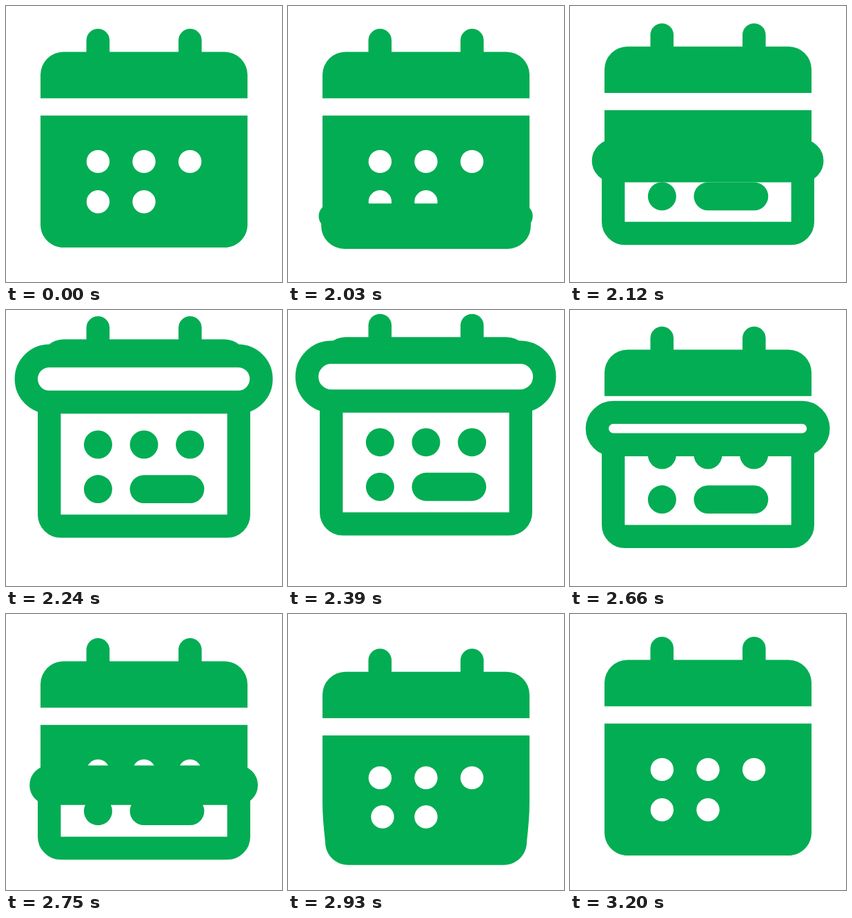
Recreate the animation shown at these times as an HTML page with a canvas. Size 400 by 400 pixels, loop 3.26 s.

```html
<!DOCTYPE html>
<html lang="en">
<head>
<meta charset="utf-8">
<title>Calendar</title>
<style>
  html, body { margin: 0; width: 100%; height: 100%; overflow: hidden; background: #fff; }
  canvas { display: block; width: 100vmin; height: 100vmin; }
</style>
</head>
<body>
<canvas id="stage" width="400" height="400"></canvas>
<script>
const ctx = document.getElementById('stage').getContext('2d');
const GREEN = '#03ad53', WHITE = '#fff';
const LOOP = 3260, START = 2000, STEP = 30, END = 1200;
const STROKE = 33.4, TAU = Math.PI * 2;

// Smooth curve through [time, value] keys that never overshoots between them.
function track(...keys) {
  const rise = i => (keys[i + 1][1] - keys[i][1]) / (keys[i + 1][0] - keys[i][0]);
  const slopes = keys.map((_, i) => {
    if (i === 0 || i === keys.length - 1) return 0;
    const a = rise(i - 1), b = rise(i);
    return a * b > 0 ? 2 * a * b / (a + b) : 0;
  });
  return t => {
    if (t <= keys[0][0]) return keys[0][1];
    const i = keys.findIndex(k => k[0] >= t) - 1;
    if (i < 0) return keys[keys.length - 1][1];
    const [t0, v0] = keys[i], [t1, v1] = keys[i + 1];
    const d = t1 - t0, u = (t - t0) / d, w = 1 - u;
    return v0 * (1 + 2 * u) * w * w + v1 * u * u * (3 - 2 * u)
      + d * u * w * (slopes[i] * w - slopes[i + 1] * u);
  };
}

const lift = track([0, 0], [30, 0], [240, -24], [330, -29], [480, -23.8], [540, -23.4],
  [660, -9], [820, 9.5], [930, 17.3], [1080, 1.5], [1200, 0]);
const open = track([0, 0], [30, .047], [135, .5], [240, 1], [330, 1.08], [480, 1.005], [540, 1],
  [660, .7], [760, .32], [860, 0]);
const squeeze = track([850, 0], [930, 4], [1080, -5.5], [1200, 0]);
const lag = track([780, 0], [930, 1], [1080, 0]);

function fillPath(color, build) {
  ctx.fillStyle = color;
  ctx.beginPath();
  build();
  ctx.fill();
}

const dot = (color, x, y, r) => fillPath(color, () => ctx.arc(x, y, r, 0, TAU));
const box = (x, y, w, h, r) => fillPath(GREEN, () => ctx.roundRect(x, y, w, h, r));

function clipped(y, h, draw) {
  ctx.save();
  ctx.beginPath();
  ctx.rect(0, y, 400, h);
  ctx.clip();
  draw();
  ctx.restore();
}

function solidIcon(dy, s, l) {
  for (const x of [116.5, 250]) box(x, 33 + dy, 33.6, 40, [16.8, 16.8, 0, 0]);
  box(50, 66.5 + dy, 300, 67.2, [33.3, 33.3, 0, 0]);

  const top = 158.7 + dy, bottom = 350 + dy - 3.5 * l;
  const left = 50 + s, right = 350 - s;
  const bend = bottom - 90, foot = bottom - 33.3;
  fillPath(GREEN, () => {
    ctx.moveTo(50, top);
    ctx.lineTo(350, top);
    ctx.lineTo(350, bend);
    ctx.quadraticCurveTo(350, bend + 22, right, foot);
    ctx.bezierCurveTo(right, foot + 18.4, right - 14.9, bottom, right - 33.3, bottom);
    ctx.lineTo(left + 33.3, bottom);
    ctx.bezierCurveTo(left + 14.9, bottom, left, foot + 18.4, left, foot);
    ctx.quadraticCurveTo(50, bend + 22, 50, bend);
  });

  const row1 = 225.4 + dy - 5.3 * l, row2 = 283.7 + dy - 7 * l;
  for (const x of [133.4, 200, 266.6]) dot(WHITE, x, row1, 16.7);
  dot(WHITE, 133.4 + s * .9, row2, 16.7);
  dot(WHITE, 200, row2, 16.7);
}

function outlineIcon(dy, ringY, grow, l) {
  const x = 66.7 - grow, right = 400 - x, r = STROKE / 2;
  const y = 333.3 + grow + dy - 3.5 * l;
  ctx.beginPath();
  ctx.moveTo(x, ringY);
  ctx.arcTo(x, y, 200, y, r);
  ctx.arcTo(right, y, right, ringY, r);
  ctx.lineTo(right, ringY);
  ctx.stroke();

  const row1 = 219 + dy, row2 = 283.6 + dy;
  for (const cx of [133.4, 200, 266.6]) dot(GREEN, cx, row1, 20.5);
  dot(GREEN, 133.4, row2, 20.5);
  box(179.5, row2 - 20.4, 107.8, 40.8, 20.4);
}

function draw(t) {
  const dy = lift(t), p = open(t), s = squeeze(t), l = lag(t);
  ctx.fillStyle = WHITE;
  ctx.fillRect(0, 0, 400, 400);
  ctx.strokeStyle = GREEN;
  ctx.lineWidth = STROKE;

  if (p < .001) {
    solidIcon(dy, s, l);
    return;
  }
  const ringY = 313.5 - 189.5 * Math.min(p, 1) + dy, r = 33.5 * p;
  clipped(0, ringY, () => solidIcon(dy, s, l));
  clipped(ringY, 400 - ringY, () => outlineIcon(dy, ringY, 4 * Math.min(1, p * 10), l));
  ctx.fillStyle = WHITE;
  ctx.beginPath();
  ctx.roundRect(62.8 - r, ringY - r, 273.6 + 2 * r, 2 * r, r);
  ctx.fill();
  ctx.stroke();
}

function tick() {
  const t = performance.now() % LOOP - START;
  draw(Math.min(END, Math.max(0, Math.floor(t / STEP) * STEP)));
  requestAnimationFrame(tick);
}
tick();
</script>
</body>
</html>
```
